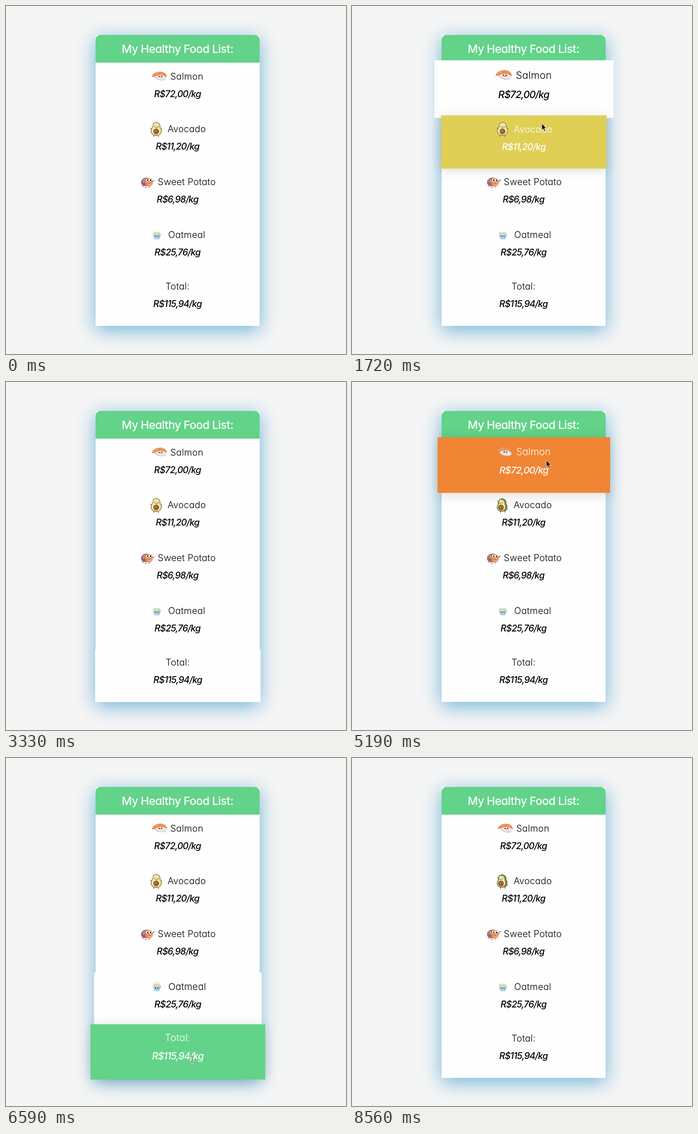
Write an HTML page with a canvas that moves like this. It is 740x756 px and loops after 8640 ms.

```html
<!DOCTYPE html>
<html lang="en">
<head>
<meta charset="utf-8">
<title>My Healthy Food List</title>
<style>
  html, body { margin: 0; width: 100%; height: 100%; overflow: hidden; background: #f5f5f5; }
  #stage {
    position: relative; width: 740px; height: 756px; overflow: hidden;
    font-family: Inter, "Open Sans", sans-serif;
    font-feature-settings: "cv11";
  }
  .card, .head, .row, .row > *, #pointer { position: absolute; }
  .card {
    left: 194.5px; top: 63px; width: 357.5px; height: 632px; background: #fefefe;
    border-radius: 3px 3px 0 0; box-shadow: 0 9px 41px rgba(86, 168, 212, .86);
  }
  .head {
    left: 194.5px; top: 63px; width: 357.5px; height: 60px; border-radius: 10px 10px 0 0;
    background: #62d388; color: #fff; text-align: center;
    font-size: 24.5px; font-weight: 540; line-height: 60px; letter-spacing: -.55px;
  }
  .row { left: 194.5px; width: 357.5px; background: #fefefe; color: #000; }
  .row > * { white-space: nowrap; line-height: 30px; transform: translate(-50%, -50%); }
  .name { font-size: 20px; font-weight: 300; letter-spacing: .25px; }
  .price { font-size: 19.8px; font-weight: 480; font-style: italic; letter-spacing: -.85px; }
  .row canvas { width: 48px; height: 44px; }
  #pointer { left: 0; top: 0; }
</style>
</head>
<body>
<div id="stage">
  <div class="card"></div>
  <div class="head">My Healthy Food List:</div>
</div>
<script>
const LOOP = 8640, STEP = LOOP / 125, GROW = 500, TAU = Math.PI * 2;
const TOP = 123, PITCH = 114.8, MID = 178.75;
const stage = document.getElementById('stage');

// hover: [enter, leave] for each pass of the pointer
const rows = [
  { name: 'Salmon', price: 'R$72,00/kg', color: '#f08533', half: 36, icon: salmon, at: [-39.3, 28.5],
    hover: [[1200, 1672], [5040, 5420]] },
  { name: 'Avocado', price: 'R$11,20/kg', color: '#dfcf55', half: 42, icon: avocado, at: [-45.8, 30.2],
    hover: [[1690, 1950], [5420, 5730]] },
  { name: 'Sweet Potato', price: 'R$6,98/kg', color: '#bd6a62', half: 62, icon: potato, at: [-65.3, 30],
    hover: [[1950, 2230], [5730, 6030]] },
  { name: 'Oatmeal', price: 'R$25,76/kg', color: '#dab36c', half: 42, icon: oatmeal, at: [-44.8, 31],
    hover: [[2230, 2600], [6030, 6345]] },
  { name: 'Total:', price: 'R$115,94/kg', color: '#62d388', half: 25,
    hover: [[2600, 2980], [6385, 6900]] }
];

// pointer stops: time, x, y
const path = [
  [90, 535, 775], [160, 560, 738], [300, 680, 650], [430, 722, 420], [620, 723, 155],
  [820, 590, 45], [960, 463, 25], [1080, 405, 65], [1200, 406, 123], [1480, 411, 180],
  [1670, 413, 243], [1728, 413, 255], [1950, 412, 355], [2230, 405, 470], [2557, 398, 591],
  [2800, 385, 660], [2980, 350, 705], [3130, 290, 775], [3520, 65, 775], [3720, 25, 645],
  [3960, 6, 380], [4200, 9, 105], [4360, 40, 20], [4450, 80, -30], [4760, 385, -30],
  [4930, 403, 62], [5050, 417, 122], [5184, 423, 170], [5420, 425, 243], [5730, 420, 357],
  [6030, 412, 472], [6385, 406, 585], [6566, 405, 655], [6720, 425, 682], [6900, 490, 705],
  [7060, 560, 732], [7210, 650, 738], [7330, 750, 768]
];

function add(parent, tag, cls, text) {
  const el = document.createElement(tag);
  if (cls) el.className = cls;
  if (text) el.textContent = text;
  parent.appendChild(el);
  return el;
}

function place(el, x, y) {
  el.style.left = x + 'px';
  el.style.top = y + 'px';
}

function makeCanvas(parent, w, h, ratio) {
  const c = add(parent, 'canvas');
  c.width = w * ratio;
  c.height = h * ratio;
  const g = c.getContext('2d');
  g.scale(ratio, ratio);
  return g;
}

rows.forEach((r, i) => {
  r.top = TOP + i * PITCH;
  r.shift = r.icon ? 0 : -2.5;
  r.el = add(stage, 'div', 'row');
  r.el.style.top = r.top + 'px';
  r.el.style.height = (r.icon ? 115 : 113) + 'px';
  r.nameX = MID + (r.icon ? 20.2 : 0);
  place(add(r.el, 'span', 'name', r.name), r.nameX, 29.6 + r.shift);
  place(add(r.el, 'span', 'price', r.price), MID, 67.5 + r.shift);
  if (r.icon) {
    r.g = makeCanvas(r.el, 48, 44, 3);
    place(r.g.canvas, MID + r.at[0], r.at[1]);
  }
});
const pen = makeCanvas(stage, 740, 756, 1);
pen.canvas.id = 'pointer';
pen.canvas.style.zIndex = 20;

// cubic-bezier(.25, .1, .25, 1)
function ease(x) {
  if (x <= 0) return 0;
  if (x >= 1) return 1;
  let lo = 0, hi = 1, s = .5;
  const curve = (s, a, b) => 3 * a * s * (1 - s) ** 2 + 3 * b * s * s * (1 - s) + s ** 3;
  for (let i = 0; i < 24; i++) {
    s = (lo + hi) / 2;
    if (curve(s, .25, .25) < x) lo = s; else hi = s;
  }
  return curve(s, .1, 1);
}

function growth(r, t) {
  let best = 0;
  for (const [from, to] of r.hover) {
    if (t <= from) continue;
    const peak = ease((Math.min(t, to) - from) / GROW);
    best = Math.max(best, t <= to ? peak : peak * (1 - ease((t - to) / (GROW * peak))));
  }
  return best;
}

function pointerAt(t) {
  const n = path.length;
  if (t < path[0][0] || t > path[n - 1][0]) return null;
  let i = 0;
  while (i < n - 2 && t > path[i + 1][0]) i++;
  const p = path[i], q = path[i + 1], o = path[Math.max(i - 1, 0)], e = path[Math.min(i + 2, n - 1)];
  const span = q[0] - p[0], u = (t - p[0]) / span;
  return [1, 2].map(k => {
    const m0 = (q[k] - o[k]) / (q[0] - o[0]) * span;
    const m1 = (e[k] - p[k]) / (e[0] - p[0]) * span;
    return (2 * u ** 3 - 3 * u * u + 1) * p[k] + (u ** 3 - 2 * u * u + u) * m0
      + (3 * u * u - 2 * u ** 3) * q[k] + (u ** 3 - u * u) * m1;
  });
}

function oval(g, x, y, rx, ry, fill, turn = 0) {
  g.beginPath();
  g.ellipse(x, y, rx, ry, turn, 0, TAU);
  g.fillStyle = fill;
  g.fill();
}

function shape(g, d, fill, line, width = 1) {
  const p = new Path2D(d);
  if (fill) { g.fillStyle = fill; g.fill(p); }
  if (line) { g.strokeStyle = line; g.lineWidth = width; g.stroke(p); }
}

function face(g, x, y, gap) {
  for (const s of [-1, 1]) {
    oval(g, x + s * gap, y, 1.2, 1.3, '#2b2022');
    oval(g, x + s * (gap + 1.8), y + 2, 1.1, .7, '#f0a9a0');
  }
  shape(g, `M${x - 1} ${y + 1.5}q1 1.2 2 0`, null, '#57332f', .7);
}

function salmon(g, t) {
  const wave = Math.sin(t / 850 * TAU);
  g.rotate(.05 + .06 * wave);
  oval(g, 2, 3.2, 13, 6, '#cfc4c0', .12);
  oval(g, 2.5, 2.6, 12, 5.2, '#efe8e5', .12);
  shape(g, 'M-16.5 3C-15-5-6-10 3-9.5C11-9 16-4 16.5 2.5C12-1 8-2 2-2C-5-2-10 3-16.5 3Z', '#e98a4b');
  shape(g, 'M-12 0q3-5 7-7M-6-2q2-4 5-6M2-3q1-3 3-5M8-2q0-3 1-5', null, '#f6bd93', .9);
  face(g, 2, 1, 2.6);
}

function avocado(g, t) {
  const turn = .5 + .5 * Math.cos((t / 560 - .43) * TAU);
  const side = turn > .42;
  g.rotate(side ? -.08 * turn : .03);
  shape(g, 'M-5 11v4M5 11v4', null, '#a98954', 2.2);
  if (side) {
    shape(g, 'M-6-6L-10-10M8 6L11 10', null, '#bda45f', 2);
    shape(g, 'M-3-14C5-16 10-10 9-3C12 5 10 13 1 13C-10 14-14 6-10-1C-8-5-9-12-3-14Z', '#6f8a45', '#4c5f35', .8);
    shape(g, 'M-3-12.5C3-13 6-8 5-3C8 4 6 11-1 11.5C-10 12-12 5-9 0C-6-5-8-11-3-12.5Z', '#efe6a6');
  } else {
    shape(g, 'M-8 2L-12-2M8 2L12-2', null, '#a98954', 2);
    shape(g, 'M0-15C6-15 8-10 8-5C13 1 13 13 0 13C-13 13-13 1-8-5C-8-10-6-15 0-15Z', '#efe6a6', '#8a8149', 1.4);
  }
  const x = side ? -3 : 0;
  oval(g, x, 4.5, 6, 6, '#6d3e22');
  oval(g, x, 4.5, 5, 5, '#a9622f');
  oval(g, x - 1.5, 2.7, 1.6, 1.2, '#c98754');
  shape(g, `M${x - 4}-5q1.3-1.6 2.6 0M${x + 2}-5q1.3-1.6 2.6 0M${x - 1}-3.5q1 1 2 0`, null, '#57402a', .9);
}

function potato(g, t) {
  const wave = Math.sin(t / 700 * TAU);
  shape(g, 'M-3 8v3l-3 1M3 8v3l3 0M-8 8l-4 1', null, '#49302f', .9);
  shape(g, `M10-1L13 ${-3 - wave}l2 ${-2 - wave}`, null, '#49302f', 1.1);
  oval(g, -3.5, -1, 11, 9, '#9d666b', -.3);
  oval(g, -6, -4, 6, 4, '#bd8880', -.5);
  oval(g, 3.5, 0, 8, 9.5, '#ed8a56', .2);
  oval(g, 5, 4, 4.5, 4, '#f5a473');
  for (const x of [0, 6]) {
    oval(g, x, -4.5, 3.1, 3.3, '#fff');
    oval(g, x + .5, -4.3 + .4 * wave, 1.6, 1.8, '#1d1718');
  }
  shape(g, 'M2.5 2q1.5 2 3.5 0', null, '#7c3526', .9);
}

function oatmeal(g, t) {
  const wave = Math.sin(t / 900 * TAU - .4);
  g.rotate(.03 * wave);
  shape(g, 'M-5-4L-7.5-8', null, '#9a9a96', .8);
  g.globalAlpha = Math.max(0, Math.min(1, .45 + .6 * wave));
  shape(g, 'M-2-6q-2-2 0-4M2-6q-2-2 0-5M5-6q-2-2 0-4', null, '#d3c3ad', .9);
  g.globalAlpha = 1;
  shape(g, 'M-8.5-4C-8 4-6 9-3 9H3C6 9 8 4 8.5-4Z', '#a9d9ea');
  shape(g, 'M6-1C6 4 5 7 3 9C6 9 8 4 8.5-4Z', '#87bfd8');
  oval(g, 0, -4, 8.5, 2.9, '#c4e3ec');
  oval(g, 0, -4, 7.4, 2.2, '#e9d2a4');
  face(g, 0, 2, 2.8);
}

function drawPointer(t) {
  pen.clearRect(0, 0, 740, 756);
  const p = pointerAt(t);
  if (!p) return;
  const overText = rows.some(r => {
    const y = p[1] - r.top - r.shift, x = p[0] - 194.5;
    return (y > 19 && y < 42 && Math.abs(x - r.nameX) < r.half)
      || (y > 53 && y < 81 && Math.abs(x - MID) < 51);
  });
  pen.save();
  pen.translate(Math.round(p[0]), Math.round(p[1]));
  if (overText) {
    const beam = 'M-3.5-7.5h2.5l1 1l1-1h2.5M0-6.5v13M-3.5 7.5h2.5l1-1l1 1h2.5';
    shape(pen, beam, null, '#fff', 3);
    shape(pen, beam, null, '#111', 1);
  } else {
    shape(pen, 'M0 0V14.5L3.3 11.6L5.6 17.5L8.2 16.4L5.8 10.8H10.2Z', '#111', '#fff', .9);
  }
  pen.restore();
}

function draw(t) {
  rows.forEach((r, i) => {
    const k = growth(r, t), on = r.hover.some(([a, b]) => t >= a && t < b), s = r.el.style;
    s.transform = k ? `scale(${1 + .1 * k})` : 'none';
    s.zIndex = k || on ? i + 2 : 1;
    s.background = on ? r.color : '#fefefe';
    s.color = on ? '#fff' : '#000';
    s.boxShadow = on ? '0 4px 24px rgba(0, 0, 0, .14)' : 'none';
    if (r.icon) {
      r.g.clearRect(0, 0, 48, 44);
      r.g.save();
      r.g.translate(24, 22);
      r.g.lineCap = 'round';
      r.icon(r.g, t);
      r.g.restore();
    }
  });
  drawPointer(t);
}

const start = performance.now();
function tick() {
  const t = (performance.now() - start) % LOOP;
  draw(Math.min(124, Math.floor((t + 10) / STEP)) * STEP);
  requestAnimationFrame(tick);
}
tick();
</script>
</body>
</html>
```
